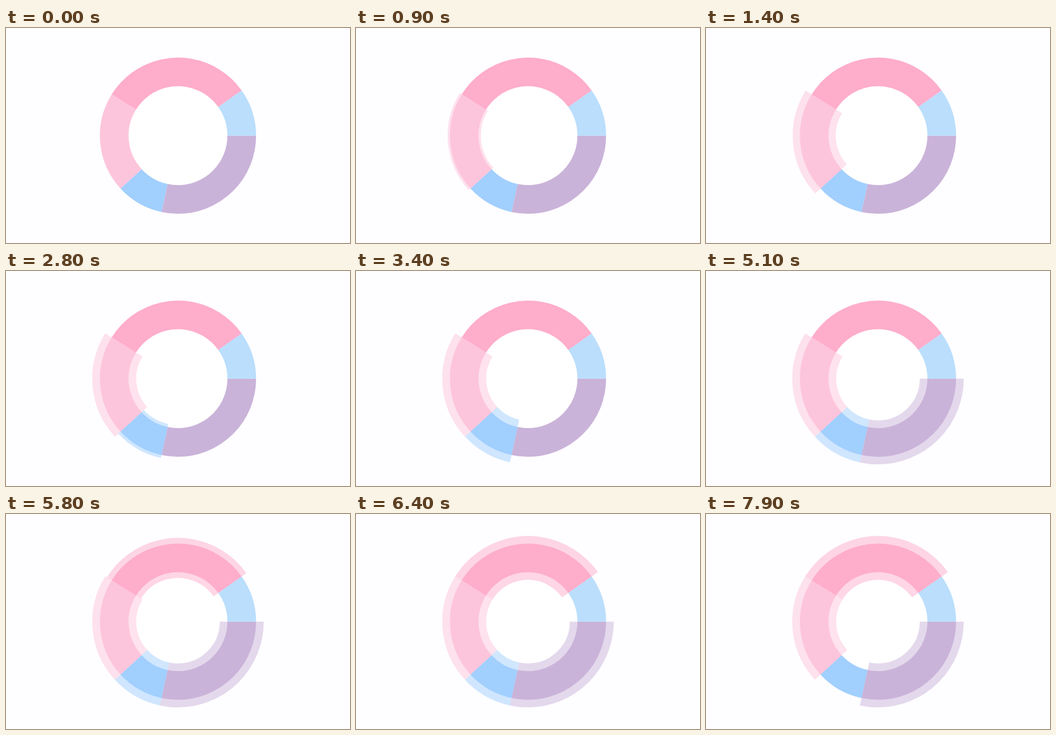
Animation, 600 px wide and 375 px high, one loop 8000 ms. Source, as an HTML page with a canvas:

```html
<!DOCTYPE html>
<html lang="en">
<head>
<meta charset="utf-8">
<title>Donut chart</title>
<style>
  html, body { margin: 0; height: 100%; overflow: hidden; background: #fefdff; }
  canvas { display: block; }
</style>
</head>
<body>
<canvas width="600" height="375"></canvas>
<script>
const ctx = document.querySelector('canvas').getContext('2d');
const LOOP = 8000, GROW = 1000;
const CX = 300, CY = 187.8, RADIUS = 111.2, WIDTH = 50, EXTRA = 26.6;

// Angles in degrees, clockwise from the right; open/close in ms
const slices = [
  { from: 0, to: 102.2, color: '#cab3d9', open: 4095 },
  { from: 102.2, to: 137.4, color: '#a1cffe', open: 2555, close: 6950 },
  { from: 137.4, to: 211.9, color: '#fdc5db', open: 700 },
  { from: 211.9, to: 324.6, color: '#feadcb', open: 5350 },
  { from: 324.6, to: 360, color: '#badefc' }
];

// cubic-bezier(.25, .1, .25, 1)
function ease(x) {
  if (x <= 0) return 0;
  if (x >= 1) return 1;
  const curve = (a, b, s) => 3 * a * s * (1 - s) ** 2 + 3 * b * s * s * (1 - s) + s ** 3;
  let lo = 0, hi = 1;
  for (let i = 0; i < 24; i++) {
    const mid = (lo + hi) / 2;
    if (curve(.25, .25, mid) < x) lo = mid; else hi = mid;
  }
  return curve(.1, 1, lo);
}

const progress = (t, start = Infinity) => ease((t - start) / GROW);

function band({ from, to, color }, width, alpha) {
  ctx.globalAlpha = alpha;
  ctx.strokeStyle = color;
  ctx.lineWidth = width;
  ctx.beginPath();
  ctx.arc(CX, CY, RADIUS, from * Math.PI / 180, to * Math.PI / 180);
  ctx.stroke();
}

function draw(now) {
  const t = now % LOOP;
  ctx.globalAlpha = 1;
  ctx.fillStyle = '#fefdff';
  ctx.fillRect(0, 0, 600, 375);
  ctx.fillStyle = '#fff';
  ctx.beginPath();
  ctx.arc(CX, CY, RADIUS, 0, 2 * Math.PI);
  ctx.fill();

  for (const s of slices) {
    const grown = progress(t, s.open) - progress(t, s.close);
    if (grown > 0) band(s, WIDTH + EXTRA * grown, .5);
  }
  for (const s of slices) band(s, WIDTH, 1);
  requestAnimationFrame(draw);
}
requestAnimationFrame(draw);
</script>
</body>
</html>
```
